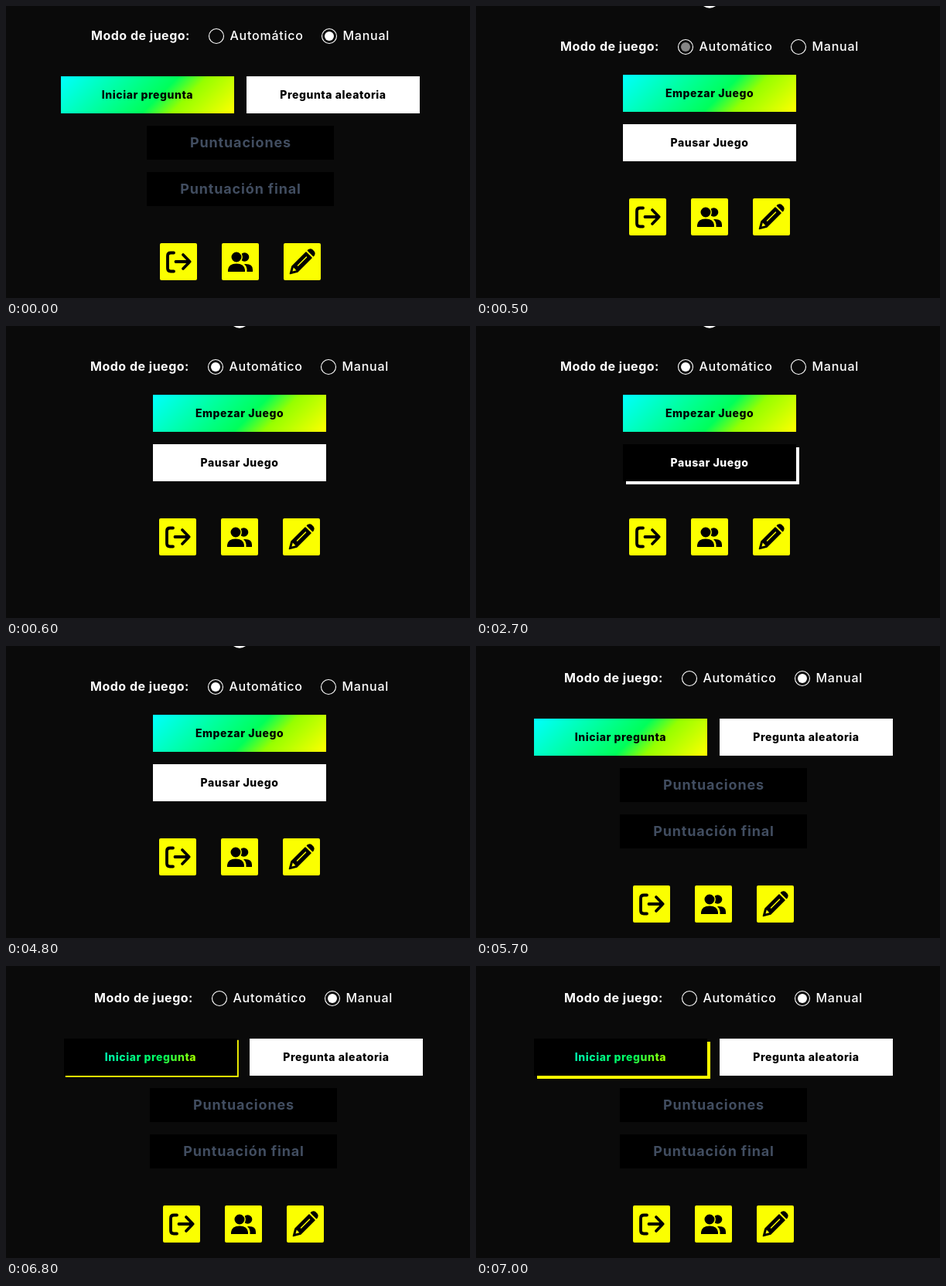
Recreate the animation shown at these times as an HTML page. Size 600 by 378 pixels, loop 8 s.

```html
<!DOCTYPE html>
<html lang="es">
<head>
<meta charset="utf-8">
<title>Modo de juego</title>
<style>
  html, body { margin: 0; width: 100%; height: 100%; overflow: hidden; background: #0a0a0a; }
  svg { display: block; width: 600px; height: 378px; font-family: Inter, "Open Sans", sans-serif; }
  .label { font-size: 16px; font-weight: 500; fill: #fff; letter-spacing: .75px; }
  .title { font-weight: 700; letter-spacing: .5px; }
  .btn text { font-size: 14px; font-weight: 800; letter-spacing: .55px; text-anchor: middle; }
  .off text { font-size: 18px; font-weight: 700; letter-spacing: .85px; text-anchor: middle; fill: #414d60; }
  .ring { fill: none; stroke: #fff; stroke-width: 1.1; }
  .line { fill: none; stroke: #000; stroke-width: 3.8; stroke-linecap: round; stroke-linejoin: round; }
</style>
</head>
<body>
<svg viewBox="0 0 600 378">
  <defs>
    <linearGradient id="neon" gradientUnits="userSpaceOnUse" x1="44" y1="-44" x2="180" y2="92">
      <stop offset="0" stop-color="#0ff"/>
      <stop offset=".56" stop-color="#00ff5a"/>
      <stop offset=".7" stop-color="#96ff00"/>
      <stop offset="1" stop-color="#ff0"/>
    </linearGradient>

    <g id="header">
      <text class="label title" x="110" y="44">Modo de juego:</text>
      <circle class="ring" cx="272" cy="39" r="9.5"/>
      <text class="label" x="289.5" y="44">Automático</text>
      <circle class="ring" cx="418" cy="39" r="9.5"/>
      <text class="label" x="435.5" y="44">Manual</text>
    </g>

    <g id="tile"><rect width="48" height="48" rx="2" fill="#fbff00"/></g>

    <g id="icons">
      <use href="#tile"/>
      <path class="line" d="M18 12.5H14Q10 12.5 10 16.5V32.5Q10 36.5 14 36.5H18M20.5 24H38.5M30 15L38.7 24L30 33"/>
      <g transform="translate(80 0)">
        <use href="#tile"/>
        <circle cx="29.5" cy="18" r="5.8"/>
        <path d="M32.5 37V33.5Q32 29.5 29 27Q40 26 40 34V37Z"/>
        <circle cx="19" cy="18" r="7.2" stroke="#fbff00" stroke-width="1.4"/>
        <path d="M8 37V34.5Q9 26.5 19 26.5T30 34.5V37Z"/>
      </g>
      <g transform="translate(160 0)">
        <use href="#tile"/>
        <path d="M8.5 39.5L11 30L29 12L36 19L18 37Z" stroke="#000" stroke-width="1.6" stroke-linejoin="round"/>
        <path d="M31.5 9.5L33 8.5Q35 7.5 37 9L39 11Q40.5 13 39.5 15L38.5 16.5Z" stroke="#000" stroke-width="1.6" stroke-linejoin="round"/>
        <path d="M18.5 29L29.5 18" stroke="#fbff00" stroke-width="1.5" stroke-linecap="round"/>
        <path d="M11.5 36.5L12.8 31.6L16.4 35.2Z" fill="#fbff00"/>
      </g>
    </g>
  </defs>

  <rect width="600" height="378" fill="#0a0a0a"/>

  <g id="manual">
    <use href="#header"/>
    <circle cx="418" cy="39" r="6" fill="#fff"/>
    <g class="btn" id="start" transform="translate(71 91)">
      <rect width="224" height="48" fill="#ff0"/>
      <rect width="224" height="48"/>
      <text x="112" y="29">Iniciar pregunta</text>
    </g>
    <g class="btn" transform="translate(311 91)">
      <rect width="224" height="48" fill="#fff"/>
      <text x="112" y="29">Pregunta aleatoria</text>
    </g>
    <g class="off">
      <rect x="182" y="155" width="242" height="44"/>
      <text x="303.5" y="183">Puntuaciones</text>
      <rect x="182" y="215" width="242" height="44"/>
      <text x="303.5" y="243">Puntuación final</text>
    </g>
    <use href="#icons" x="199" y="307"/>
  </g>

  <g id="auto">
    <path d="M294 0Q302 5.5 310 0Z" fill="#fff"/>
    <use href="#header" x="-1" y="14"/>
    <circle id="dot" cx="271" cy="53" r="6" fill="#fff"/>
    <g class="btn" transform="translate(190 89)">
      <rect width="224" height="48" fill="url(#neon)"/>
      <text x="112" y="29">Empezar Juego</text>
    </g>
    <g class="btn" id="pause" transform="translate(190 153)">
      <rect width="224" height="48" fill="#fff"/>
      <rect width="224" height="48"/>
      <text x="112" y="29">Pausar Juego</text>
    </g>
    <use href="#icons" x="198" y="249"/>
  </g>
</svg>
<script>
  const LOOP = 8000;
  const $ = id => document.getElementById(id);

  // Each step: start time, visible panel, panel shift, hover amount, radio dot opacity
  const steps = [
    { at: 0,    panel: 'manual', shift: '0 0', hover: 0 },
    { at: 500,  panel: 'auto', hover: 0, dot: .5 },
    { at: 600,  panel: 'auto', hover: 0, dot: 1 },
    { at: 2700, panel: 'auto', hover: 1, dot: 1 },
    { at: 4800, panel: 'auto', hover: 0, dot: 1 },
    { at: 5700, panel: 'manual', shift: '4 3', hover: 0 },
    { at: 6800, panel: 'manual', shift: '4 3', hover: .45 },
    { at: 6900, panel: 'manual', shift: '4 3', hover: .85 },
    { at: 7000, panel: 'manual', shift: '4 3', hover: 1 }
  ];

  // Hovering swaps face and text paint and slides out a hard shadow
  function paintButton(id, paint, hover) {
    const [shadow, face, text] = $(id).children;
    shadow.setAttribute('transform', `translate(${4 * hover} ${4 * hover})`);
    shadow.style.display = hover ? '' : 'none';
    face.setAttribute('fill', hover ? '#000' : paint);
    text.setAttribute('fill', hover ? paint : '#000');
  }

  function show(step) {
    const manual = step.panel === 'manual';
    $('manual').style.display = manual ? '' : 'none';
    $('auto').style.display = manual ? 'none' : '';
    if (manual) {
      $('manual').setAttribute('transform', `translate(${step.shift})`);
      paintButton('start', 'url(#neon)', step.hover);
    } else {
      $('dot').setAttribute('opacity', step.dot);
      paintButton('pause', '#fff', step.hover);
    }
  }

  let current;
  function tick() {
    const t = performance.now() % LOOP;
    const step = steps.findLast(s => s.at <= t);
    if (step !== current) show(current = step);
    requestAnimationFrame(tick);
  }
  tick();
</script>
</body>
</html>
```
